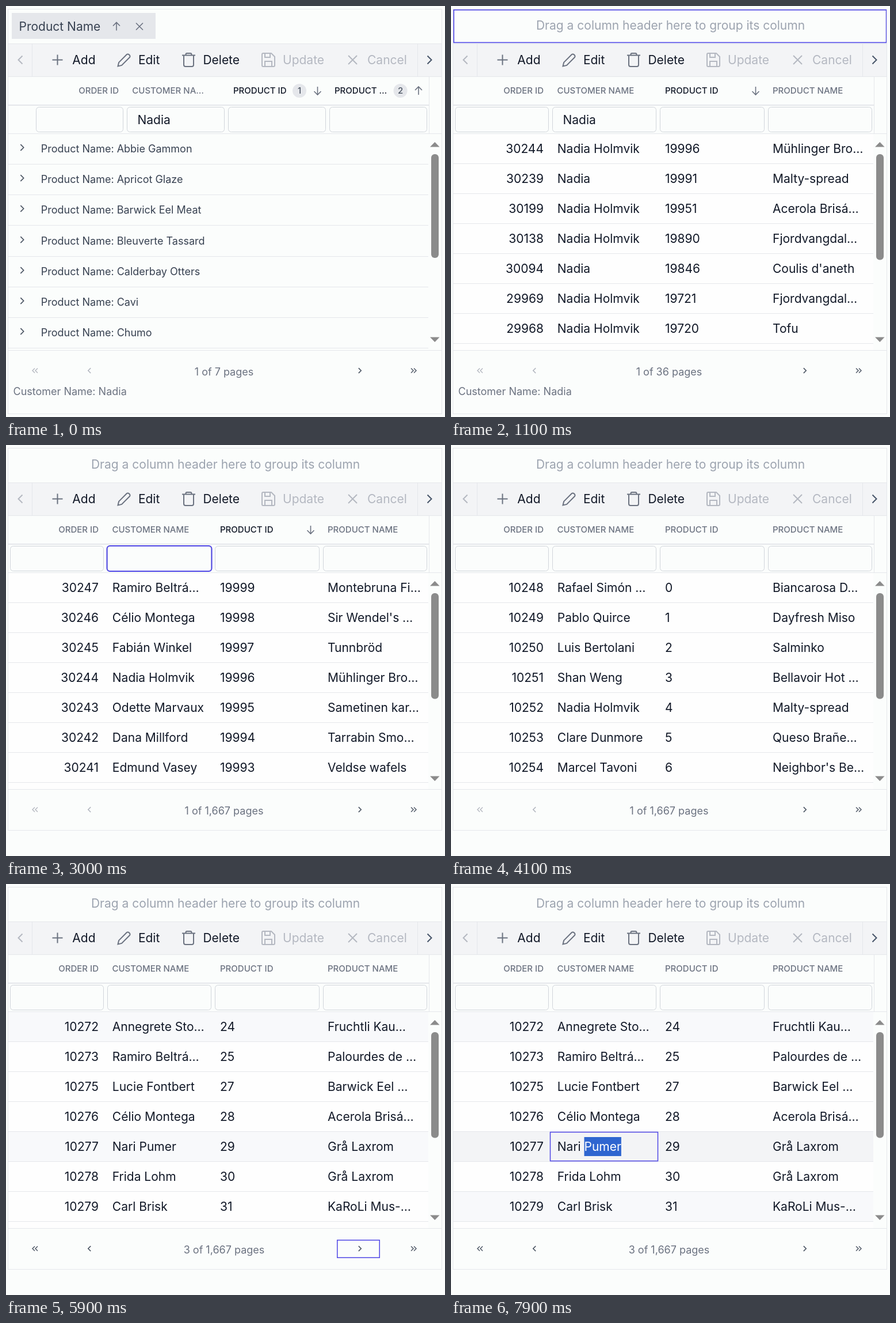
An HTML page that plays this animation: 763 px wide and 713 px high, repeating every 8 s.

```html
<!DOCTYPE html>
<html lang="en">
<head>
<meta charset="utf-8">
<title>Data grid</title>
<style>
  html, body { margin: 0; width: 100%; height: 100%; overflow: hidden; background: #fbfdfc; }
  svg { display: block; font-family: Inter, "Open Sans", sans-serif; }
  text { white-space: pre; }
  .popup { filter: drop-shadow(0 8px 11px #0003); font-family: "Open Sans", "Noto Sans", sans-serif; }
</style>
</head>
<body>
<svg id="stage" width="763" height="713" viewBox="0 0 763 713"></svg>
<script>
const LOOP = 8000, FIRST_ID = 10248;
const INK = '#111827', DARK = '#374151', GREY = '#4b5563', ICON = '#6b7280', OFF = '#b4b8c1';
const LINE = '#e5e7eb', ACCENT = '#4f46e5', BAR = '#f3f4f6', SHADE = '#f8f9fb';
const FILTER = 'Nadia', NAME_X = 184.8;

const groups = ['Abbie Gammon', 'Apricot Glaze', 'Barwick Eel Meat', 'Bleuverte Tassard', 'Calderbay Otters', 'Cavi', 'Chumo'];

// Each row: order id, customer, product
const filtered = [
  [30244, 'Nadia Holmvik', 'Mühlinger Bro…'], [30239, 'Nadia', 'Malty-spread'],
  [30199, 'Nadia Holmvik', 'Acerola Brisá…'], [30138, 'Nadia Holmvik', 'Fjordvangdal…'],
  [30094, 'Nadia', 'Coulis d\'aneth'], [29969, 'Nadia Holmvik', 'Fjordvangdal…'],
  [29968, 'Nadia Holmvik', 'Tofu']];
const newest = [
  [30247, 'Ramiro Beltrá…', 'Montebruna Fi…'], [30246, 'Célio Montega', 'Sir Wendel\'s …'],
  [30245, 'Fabián Winkel', 'Tunnbröd'], [30244, 'Nadia Holmvik', 'Mühlinger Bro…'],
  [30243, 'Odette Marvaux', 'Sametinen kar…'], [30242, 'Dana Millford', 'Tarrabin Smo…'],
  [30241, 'Edmund Vasey', 'Veldse wafels']];
const page1 = [
  [10248, 'Rafael Simón …', 'Biancarosa D…'], [10249, 'Pablo Quirce', 'Dayfresh Miso'],
  [10250, 'Luis Bertolani', 'Salminko'], [10251, 'Shan Weng', 'Bellavoir Hot …'],
  [10252, 'Nadia Holmvik', 'Malty-spread'], [10253, 'Clare Dunmore', 'Queso Brañe…'],
  [10254, 'Marcel Tavoni', 'Neighbor\'s Be…']];
const page2 = [
  [10260, 'Odette Marvaux', 'Coulis d\'aneth'], [10261, 'Pablo Quirce', 'Veldse wafels'],
  [10262, 'Clare Dunmore', 'Tunnbröd'], [10263, 'Fabián Winkel', 'Dayfresh Miso'],
  [10264, 'Dana Millford', 'Acerola Brisá…'], [10265, 'Edmund Vasey', 'Montebruna Fi…'],
  [10266, 'Luis Bertolani', 'Salminko']];
const page3 = [
  [10272, 'Annegrete Sto…', 'Fruchtli Kau…'], [10273, 'Ramiro Beltrá…', 'Palourdes de …'],
  [10275, 'Lucie Fontbert', 'Barwick Eel …'], [10276, 'Célio Montega', 'Acerola Brisá…'],
  [10277, 'Nari Pumer', 'Grå Laxrom'], [10278, 'Frida Lohm', 'Grå Laxrom'],
  [10279, 'Carl Brisk', 'KaRoLi Mus-…']];

const stage = document.getElementById('stage');
const pen = document.createElement('canvas').getContext('2d');
pen.font = '21px Inter, "Open Sans", sans-serif';
const textWidth = s => pen.measureText(s).width;

const text = (x, y, s, size = 21, fill = INK, more = '') =>
  `<text x="${x}" y="${y}" font-size="${size}" fill="${fill}" ${more}>${s}</text>`;
const box = (x, y, w, h, fill, more = '') =>
  `<rect x="${x}" y="${y}" width="${w}" height="${h}" fill="${fill}" ${more}/>`;
const frame = (x, y, w, h, color, width = 1, r = 0) =>
  box(x, y, w, h, 'none', `stroke="${color}" stroke-width="${width}" rx="${r}"`);
const path = (d, color = ICON, width = 2) =>
  `<path d="${d}" fill="none" stroke="${color}" stroke-width="${width}"/>`;
const cross = (x, y, r, color, width) =>
  path(`M${x - r} ${y - r}l${2 * r} ${2 * r}m0 ${-2 * r}l${-2 * r} ${2 * r}`, color, width);
// dir: 1 points right, -1 left
const chevron = (x, y, r, dir, color, width = 1.6) =>
  path(`M${x - dir * r / 2} ${y - r}l${dir * r} ${r}l${-dir * r} ${r}`, color, width);
// dir: 1 points down, -1 up
const arrow = (x, y, dir) =>
  path(`M${x} ${y - 7 * dir}v${14 * dir}m-6 ${-6 * dir}l6 ${6 * dir} 6 ${-6 * dir}`, ICON, 1.6);
const badge = (x, n) => `<circle cx="${x}" cy="147" r="12" fill="${LINE}"/>` +
  text(x, 152, n, 15, GREY, 'text-anchor="middle" font-weight="500"');
const heading = (x, s, color = ICON, more = '') => text(x, 152, s, 15, color, `font-weight="500" ${more}`);
const END = 'text-anchor="end"', MID = 'text-anchor="middle"';

function dropArea(t) {
  if (t < 900) {
    const fill = t < 500 ? LINE : t < 600 ? '#dbdee3' : '#d1d5db';
    return box(10, 12, 250, 45, fill) + text(22.5, 43, 'Product Name', 21, DARK) +
      arrow(192, 35.5, -1) + cross(232, 35.5, 6, ICON, 1.6);
  }
  return text(381.5, 41, 'Drag a column header here to group its column', 21, '#9ca3af', MID) +
    (t < 1700 ? frame(4.8, 6.8, 751.8, 56.6, ACCENT, 1.6) : '');
}

function toolbar(t) {
  return box(4, 65, 753, 58, BAR) + box(4, 65, 753, 1, LINE) + box(4, 122, 753, 1, LINE) +
    box(45, 66, 1, 56, LINE) + box(715, 66, 1, 56, LINE) +
    (t >= 200 && t < 300 ? box(292, 71, 126, 45, LINE, 'rx="6"') : '') +
    chevron(25, 93.5, 7, -1, OFF, 2) + chevron(736, 93.5, 7, 1, '#475569', 2) +
    path('M89.5 84.5v18M80.5 93.5h18') +
    path('M194.5 104.5l1.6-6.6 13.6-13.6a2.8 2.8 0 0 1 4 0l1 1a2.8 2.8 0 0 1 0 4l-13.6 13.6z') +
    path('M306 85.5h23M312.5 85v-1a2 2 0 0 1 2-2h6a2 2 0 0 1 2 2v1M309 86v16a3 3 0 0 0 3 3h11a3 3 0 0 0 3-3v-16') +
    path('M447 82h14l6 6v15a2 2 0 0 1-2 2h-18a2 2 0 0 1-2-2v-19a2 2 0 0 1 2-2zM450 82v7h9v-7M450 105v-9h12v9', OFF) +
    cross(602.5, 93.5, 7.5, OFF, 2) +
    text(115.3, 101, 'Add') + text(229.9, 101, 'Edit') + text(342.4, 101, 'Delete') +
    text(481, 101, 'Update', 21, OFF) + text(628, 101, 'Cancel', 21, OFF);
}

function header(t, grouped) {
  const base = box(4, 171, 731, 2, LINE) + box(4, 221, 753, 1, LINE) + box(735, 123, 1, 98, LINE);
  if (grouped) return base + heading(196, 'ORDER ID', ICON, END) + heading(219.3, 'CUSTOMER NA…') +
    heading(395, 'PRODUCT ID', INK) + badge(510, 1) + arrow(541.5, 147, 1) +
    heading(571, 'PRODUCT …', INK) + badge(685.5, 2) + arrow(717, 147, -1);
  const sorted = t < 3900;
  return base + heading(161, 'ORDER ID', ICON, END) + heading(184.5, 'CUSTOMER NAME') +
    heading(372, 'PRODUCT ID', sorted ? INK : ICON) + (sorted ? arrow(529.5, 147, 1) : '') +
    heading(559, 'PRODUCT NAME');
}

function filters(t, grouped) {
  const edges = grouped ? [52, 204, 210, 380, 386, 556, 562, 732] : [7, 170, 176, 357, 363, 545, 551, 732];
  let out = '';
  for (let i = 0; i < 8; i += 2)
    out += frame(edges[i] + .5, 175.5, edges[i + 1] - edges[i] - 1, 43, '#d1d5db', 1, 5);
  if (t >= 1700 && t < 2200 || t >= 2400 && t < 3800) out += frame(175.5, 175, 182, 44, ACCENT, 2, 5);
  if (t < 2200) out += text(grouped ? 228.5 : 194.5, 205, FILTER);
  if (t >= 1700 && t < 2200) out += cross(333, 197.5, 5.5, ICON, 1.6);
  if (t >= 2400 && t < 2800 || t >= 3300 && t < 3800) out += box(195, 185, 1, 25, INK);
  return out;
}

function groupRows() {
  return groups.map((name, i) => {
    const y = Math.round(53.2 * i);
    return chevron(28, 245.5 + y, 5.3, 1, GREY, 1.7) +
      text(60.8, 254 + y, 'Product Name: ' + name, 18, DARK) + box(4, 274 + y, 730, 1, LINE);
  }).join('');
}

function rowFill(t, i) {
  if (i == 0 && t >= 4300) return SHADE;
  if (i == 4 && t >= 4400) return t < 6300 ? SHADE : t < 6900 ? '#f5f6f9' : BAR;
  if (i == 6 && (t >= 4500 && t < 4600 || t >= 6300)) return SHADE;
  return '#fefefe';
}

function editCell(t, name) {
  let out = frame(172.5, 430.5, 187, 50, ACCENT, 1.5);
  if (t >= 7800) {
    const [first, last] = name.split(' '), x = NAME_X + textWidth(first + ' ');
    out += box(x, 439, textWidth(last), 33, '#2f66d0') + text(x, 463, last, 21, '#fff');
  }
  return out;
}

function dataRows(t) {
  const rows = t < 2800 ? filtered : t < 3900 ? newest : t < 5000 ? page1 : t < 5900 ? page2 : page3;
  let out = box(4, 586, 730, 11, '#fefefe');
  rows.forEach(([id, customer, product], i) => {
    const y = 52 * i;
    out += box(4, 222 + y, 730, 51, rowFill(t, i)) + box(4, 273 + y, 730, 1, LINE) +
      text(161, 255 + y, id, 21, INK, END) + text(NAME_X, 255 + y, customer) +
      text(372, 255 + y, id - FIRST_ID) + text(559, 255 + y, product);
  });
  return out + (t >= 6900 ? editCell(t, rows[4][1]) : '');
}

function scrollbar(grouped) {
  return box(739, 257, 13, grouped ? 180 : 183.5, '#8b8b8b', 'rx="6"') +
    '<path d="M737 244.5l8.3-8.5 8.2 8.5zM737 574.5l8.3 8.5 8.2-8.5z" fill="#8b8b8b"/>';
}

function pager(t, grouped) {
  const label = grouped ? '1 of 7' : t < 2800 ? '1 of 36' : (t < 5000 ? 1 : t < 5900 ? 2 : 3) + ' of 1,667';
  const back = t < 5000 ? OFF : GREY;
  return box(4, 597, 753, 1, LINE) + text(379, 641, label + ' pages', 18, ICON, MID) +
    chevron(48, 632.5, 4, -1, back, 1.4) + chevron(53, 632.5, 4, -1, back, 1.4) +
    chevron(145, 632.5, 4.4, -1, back) + chevron(615, 632.5, 4.4, 1, GREY) +
    chevron(706, 632.5, 4, 1, GREY, 1.4) + chevron(711, 632.5, 4, 1, GREY, 1.4) +
    (t >= 5000 && t < 6900 ? frame(575.8, 617.8, 73.4, 30.4, ACCENT, 1.5) : '') +
    (t < 2800 ? text(12.5, 675, 'Customer Name: ' + FILTER, 18, ICON) : '');
}

function popup(t) {
  const alpha = t < 1700 || t >= 2400 ? 0 : t < 1800 ? .6 : t < 2200 ? 1 : t < 2300 ? .8 : .5;
  if (!alpha) return '';
  return `<g class="popup" opacity="${alpha}">` + box(183, 222, 468, 155, '#fff', 'rx="10"') +
    text(203, 253, 'Saved data', 16, '#555', 'font-weight="600"') + cross(627, 247, 5.5, '#555', 1.5) +
    text(203, 303, FILTER, 16, '#333') + text(203, 353, filtered[0][1], 16, '#333') + '</g>';
}

let shown = '';
function draw() {
  const t = performance.now() % LOOP, grouped = t < 1000;
  const markup = (grouped ? groupRows() : dataRows(t)) + dropArea(t) + toolbar(t) + header(t, grouped) +
    filters(t, grouped) + scrollbar(grouped) + pager(t, grouped) +
    frame(3.5, 5.5, 754, t < 2800 ? 702 : 663, LINE) + popup(t);
  if (markup !== shown) stage.innerHTML = shown = markup;
  requestAnimationFrame(draw);
}
draw();
</script>
</body>
</html>
```
